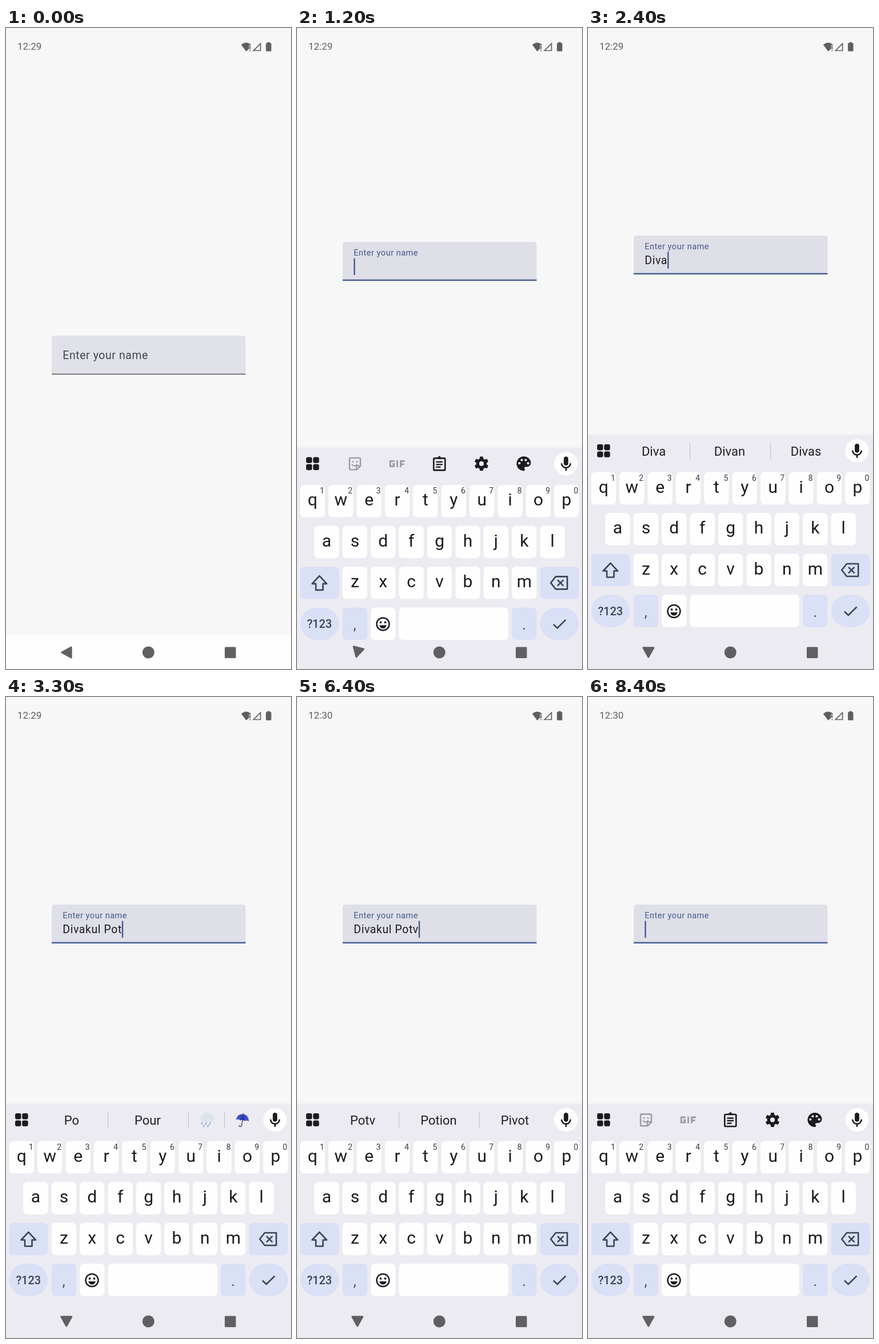
These frames come from a looping animation (499 px wide and 1121 px high, 8.9 s). An HTML page:

```html
<!DOCTYPE html>
<html lang="en">
<head>
<meta charset="utf-8">
<title>Name field</title>
<style>
  html, body { margin: 0; width: 100%; height: 100%; overflow: hidden; background: #f7f7f7; }
  svg { display: block; width: 100vw; height: 100vh; }
  text { font-family: Roboto, sans-serif; white-space: pre; }
  .mid { text-anchor: middle; }
  .key { font-size: 30px; fill: #1b1b1f; }
  .hint { font-size: 14px; fill: #3c3c42; }
  .word { font-size: 22px; fill: #1f1f24; }
  .line { fill: none; stroke: #3c4257; stroke-width: 2.6; }
  .dark { fill: #1b1b20; }
</style>
</head>
<body>
<svg viewBox="0 0 499 1121" xmlns="http://www.w3.org/2000/svg">
  <rect width="499" height="1121" fill="#f7f7f7"/>
  <rect y="1062" width="499" height="59" fill="#fefefe"/>

  <g fill="#5f5f62">
    <text id="clock" x="20" y="38.4" font-size="17"></text>
    <path d="M411.8 29.2Q420.5 22 429.3 29.2L428.6 30H425.6V36.2L420.5 41Z"/>
    <path d="M426.4 31h1.8v6h-1.8zM426.4 38.5h1.8v2h-1.8z"/>
    <path d="M445.6 27.3V39.5H433.4Z" fill="none" stroke="#5f5f62" stroke-width="1.7"/>
    <path d="M457.6 26.2v-1.4h4.4v1.4h1.2q1.3 0 1.3 1.3v12q0 1.3-1.3 1.3h-6.8q-1.3 0-1.3-1.3v-12q0-1.3 1.3-1.3z"/>
  </g>

  <g id="field">
    <path id="box" d="M80 68V5q0-5 5-5H414.5q5 0 5 5V68Z"/>
    <rect id="rule" x="80" width="339.5"/>
    <text id="label" x="99.3">Enter your name</text>
    <text id="input" x="99.3" y="50.2" font-size="19.42" letter-spacing=".607" fill="#1b1b1f"></text>
    <rect id="caret" y="28.6" width="2.4" height="29.2" fill="#425a93"/>
  </g>

  <g id="board">
    <rect y="710" width="499" height="2" fill="#f2f1f4"/>
    <rect y="712" width="499" height="409" fill="#edebf2"/>
    <g id="keys"></g>
    <g class="dark" id="grid"></g>

    <g id="tools">
      <g fill="none" stroke="#9b9aa1" stroke-width="2.4">
        <path d="M94 729.5H109q2 0 2 2V743.5L104.500 750H94q-2 0-2-2V731.500q0-2 2-2Z"/>
        <path d="M110.500 743H106q-2 0-2 2V749.500M96 740.500Q100.500 746.500 105.500 740.500" stroke-width="2"/>
        <path d="M96.500 736.200h3M103.500 736.200h3" stroke-width="2.2"/>
        <path d="M171 735H163.300V744.200H169.700V740H167M175.500 733.600V745.600M181.700 745.600V735H189M181.700 740.500H187.500" stroke-width="2.8"/>
      </g>
      <g fill="none" stroke="#1b1b20" stroke-width="2.6">
        <rect x="239.300" y="730" width="20" height="21" rx="1.500"/>
        <path d="M243.500 736.500h11.500M243.500 741h11.500M243.500 745.500h8" stroke-width="2.300"/>
      </g>
      <path class="dark" d="M245 731v-2.500h1.800q.8-2.500 2.500-2.500t2.500 2.500h1.800v2.500z"/>
      <g class="dark" id="gear" transform="translate(323 739.500)"></g>
      <g transform="translate(380.300 722.800) scale(1.390)">
        <path class="dark" d="M12 3c-4.970 0-9 4.030-9 9s4.030 9 9 9c.83 0 1.500-.67 1.500-1.500 0-.39-.15-.74-.39-1.010-.23-.26-.38-.61-.38-.99 0-.83.67-1.500 1.500-1.500H16c2.760 0 5-2.240 5-5 0-4.420-4.030-8-9-8z"/>
        <g fill="#edebf2">
          <circle cx="6.500" cy="11.500" r="1.500"/><circle cx="9.500" cy="7.500" r="1.500"/>
          <circle cx="14.500" cy="7.500" r="1.500"/><circle cx="17.500" cy="11.500" r="1.500"/>
        </g>
      </g>
    </g>

    <g id="words">
      <path d="M178.500 725v29M319.500 725v29" stroke="#c8c7cf" stroke-width="1.300"/>
      <text class="word mid" x="115" y="747.600"></text>
      <text class="word mid" x="248" y="747.600"></text>
      <text class="word mid" x="381.500" y="747.600"></text>
    </g>
    <g id="emoji">
      <path d="M382.500 725v29" stroke="#c8c7cf" stroke-width="1.300"/>
      <path d="M344 742a5 5 0 0 1 0-9.500a7.500 7.500 0 0 1 14-1.500a5.600 5.600 0 0 1 2.500 11Z" fill="#dce3eb"/>
      <path d="M344 744l-1.500 3M351 744l-1.500 3M358 744l-1.500 3M347.500 748.500l-1.500 3M354.500 748.500l-1.500 3" stroke="#86b3dc" stroke-width="1.800" stroke-linecap="round"/>
      <g transform="rotate(8 414 740)">
        <path d="M414 737V749q0 2.500-2.300 2.500t-2.300-2" fill="none" stroke="#5b5f7d" stroke-width="1.700"/>
        <path d="M402.500 741Q404 729.500 414 729.500T425.500 741Q421.500 738 418 741Q414 738 410 741Q406.500 738 402.500 741Z" fill="#4053c8"/>
        <path d="M410 741Q409.500 733.500 414 729.500Q418.500 733.500 418 741Q414 738 410 741Z" fill="#2c3aa6"/>
        <path d="M414 730v-2.500" stroke="#5b5f7d" stroke-width="1.500"/>
      </g>
    </g>

    <circle cx="471" cy="739.500" r="20.500" fill="#fefefe"/>
    <g transform="translate(455.400 724.500) scale(1.300)">
      <rect class="dark" x="9" y="2" width="6" height="12" rx="3"/>
      <path d="M6 11a6 6 0 0 0 12 0M12 17v4" fill="none" stroke="#1b1b20" stroke-width="2"/>
    </g>

    <path class="line" stroke-linejoin="round" d="M39.300 935.800L52 949.500H45.500V960.500H33V949.500H26.500Z"/>
    <path class="line" stroke-linejoin="round" d="M453 937H473.200V959H453L444.300 948Z"/>
    <path class="line" d="M456 942.800l10.500 10.500M466.500 942.800l-10.500 10.500"/>
    <path class="line" d="M449 1020.500l6.800 6.500L470.500 1012.500"/>
    <g transform="translate(150.500 1020)">
      <circle r="11" fill="none" stroke="#1b1b20" stroke-width="2.500"/>
      <path class="dark" d="M-6.500 2H6.500Q4.500 7.500 0 7.500T-6.500 2Z"/>
      <circle class="dark" cx="-4" cy="-3" r="1.900"/><circle class="dark" cx="4" cy="-3" r="1.900"/>
    </g>
  </g>

  <g fill="#606063" stroke="#606063" stroke-width="3" stroke-linejoin="round">
    <path id="back" d="M-8 0L8.300-9V9Z"/>
    <circle cx="249.300" cy="1092" r="9"/>
    <rect x="384.500" y="1084" width="16.500" height="16.500"/>
  </g>
</svg>

<script>
const $ = id => document.getElementById(id);
const LOOP = 8900, TICK = 100;
const NAME = "Divakul Potvan";

// suggestions for each number of typed letters
const HINTS = [
  "", "D|Do|Did", "Di|Did|Dinner", "Div|Dive|Dividend", "Diva|Divan|Divas",
  "Divak|Dival|Diva k", "Divaku|Diva ku|Divak u", "Divakul|Diva kul|Divak l",
  "is|and|the", "P|Please|People", "Po|Pour|", "Po|Pour|",
  "Potv|Potion|Pivot", "Potva|Pot va|Potv a", "Potvan|Pot van|Potv n"
].map(s => s.split("|"));

// [time, letters in the field]
const TYPING = [
  [0, 0], [1700, 1], [1800, 2], [2300, 3], [2400, 4], [2600, 5], [2700, 6],
  [2800, 7], [2900, 8], [3100, 9], [3300, 11], [3400, 12], [3500, 13], [3600, 14],
  [5900, 13], [6300, 12], [6500, 11], [6600, 10], [6700, 9], [6800, 8], [6900, 7],
  [7000, 6], [7100, 5], [7200, 4], [7300, 3], [7400, 2], [7500, 0]
];
const CARET_OFF = [[0, 1000], [4100, 4600], [5100, 5700], [7900, 8400]];

const clamp = v => Math.min(1, Math.max(0, v));
const mix = (a, b, p) => a + (b - a) * p;
const mixColor = (a, b, p) => `rgb(${a.map((v, i) => Math.round(mix(v, b[i], p)))})`;

function bezier(x1, y1, x2, y2) {
  const at = (a, b, u) => 3 * (1 - u) * (1 - u) * u * a + 3 * (1 - u) * u * u * b + u ** 3;
  return x => {
    if (x <= 0 || x >= 1) return clamp(x);
    let lo = 0, hi = 1;
    for (let i = 0; i < 30; i++) {
      const u = (lo + hi) / 2;
      if (at(x1, x2, u) < x) lo = u; else hi = u;
    }
    return at(y1, y2, lo);
  };
}
const slide = bezier(.2, 0, 0, 1);
const standard = bezier(.4, 0, .2, 1);

function buildBoard() {
  const WHITE = "#fefefe", BLUE = "#dae0f5", STEP = 49.4, KEY = 43.2;
  const rowY = r => 776.6 + r * 71.5;
  const rect = (x, r, w, fill, rx = 7) =>
    `<rect x="${x}" y="${rowY(r)}" width="${w}" height="56.6" rx="${rx}" fill="${fill}"/>`;
  let out = "";
  [["qwertyuiop", 5.7], ["asdfghjkl", 30.4], ["zxcvbnm", 79.8]].forEach(([row, x0], r) => {
    [...row].forEach((ch, i) => {
      const x = x0 + i * STEP;
      out += rect(x, r, KEY, WHITE);
      out += `<text class="key mid" x="${x + KEY / 2}" y="${rowY(r) + 36.2}">${ch}</text>`;
      if (!r) out += `<text class="hint mid" x="${x + 38.2}" y="792">${(i + 1) % 10}</text>`;
    });
  });
  out += rect(5.7, 2, 67.6, BLUE) + rect(425.8, 2, 67.6, BLUE);
  out += rect(5.7, 3, 67.6, BLUE, 28.3) + rect(79.8, 3, KEY, BLUE) + rect(129.2, 3, KEY, WHITE);
  out += rect(178.6, 3, 191.4, WHITE) + rect(376.2, 3, KEY, BLUE) + rect(425.8, 3, 67.6, BLUE, 28.3);
  out += `<text class="mid" x="39.3" y="1026.6" font-size="20" font-weight="500" fill="#3c4257">?123</text>`;
  [[",", 101], [".", 397.6]].forEach(([ch, x]) => {
    out += `<text class="mid" x="${x}" y="1030" font-size="26" fill="#4c5061">${ch}</text>`;
  });
  $("keys").innerHTML = out;

  $("grid").innerHTML = [[16, 728], [28.2, 728], [16, 740.4], [28.2, 740.4]]
    .map(([x, y]) => `<rect x="${x}" y="${y}" width="10.4" height="10.4" rx="3"/>`).join("");

  let teeth = "";
  for (let a = 0; a < 360; a += 60) {
    teeth += `<path transform="rotate(${a})" d="M-3.6-8L-2.6-12.4H2.6L3.6-8Z"/>`;
  }
  $("gear").innerHTML = teeth + `<circle r="9.2"/><circle r="4.1" fill="#edebf2"/>`;
}

const show = (id, on) => $(id).setAttribute("visibility", on ? "visible" : "hidden");
const set = (id, attrs) => Object.entries(attrs).forEach(([k, v]) => $(id).setAttribute(k, v));

function render(t) {
  const letters = TYPING.filter(s => s[0] <= t).pop()[1];
  const focus = standard(clamp((t - 830) / 150));
  const raised = 409 * slide(clamp((t - 1017) / 285));
  const turn = 90 * standard(clamp((t - 1045) / 280));
  const top = 538 - Math.max(0, raised - 59) / 2;

  $("clock").textContent = t < 6300 ? "12:29" : "12:30";

  set("field", { transform: `translate(0 ${top})` });
  set("box", { fill: mixColor([225, 225, 234], [222, 223, 231], focus) });
  const weight = mix(1.3, 2.4, focus);
  set("rule", {
    y: 68 - weight, height: weight,
    fill: mixColor([69, 70, 79], [66, 90, 147], focus)
  });
  set("label", {
    y: mix(40.8, 24, focus),
    "font-size": mix(19.42, 14.57, focus),
    "letter-spacing": mix(.607, .486, focus),
    fill: mixColor([68, 70, 79], [69, 88, 143], focus)
  });

  $("input").textContent = NAME.slice(0, letters);
  set("caret", { x: 99.3 + (letters ? $("input").getComputedTextLength() : 0) });
  show("caret", !CARET_OFF.some(([a, b]) => t >= a && t < b));

  set("board", { transform: `translate(0 ${409 - raised})` });
  show("board", raised > 0);
  show("tools", raised > 0 && !letters);
  show("words", letters > 0);
  show("emoji", letters === 10 || letters === 11);
  document.querySelectorAll(".word").forEach((el, i) => {
    el.textContent = HINTS[letters][i] || "";
  });

  set("back", { transform: `translate(105.800 1092) rotate(${-turn})` });
}

buildBoard();
const start = performance.now();
function loop() {
  const t = (performance.now() - start) % LOOP;
  render(Math.floor(t / TICK) * TICK);
  requestAnimationFrame(loop);
}
loop();
</script>
</body>
</html>
```
